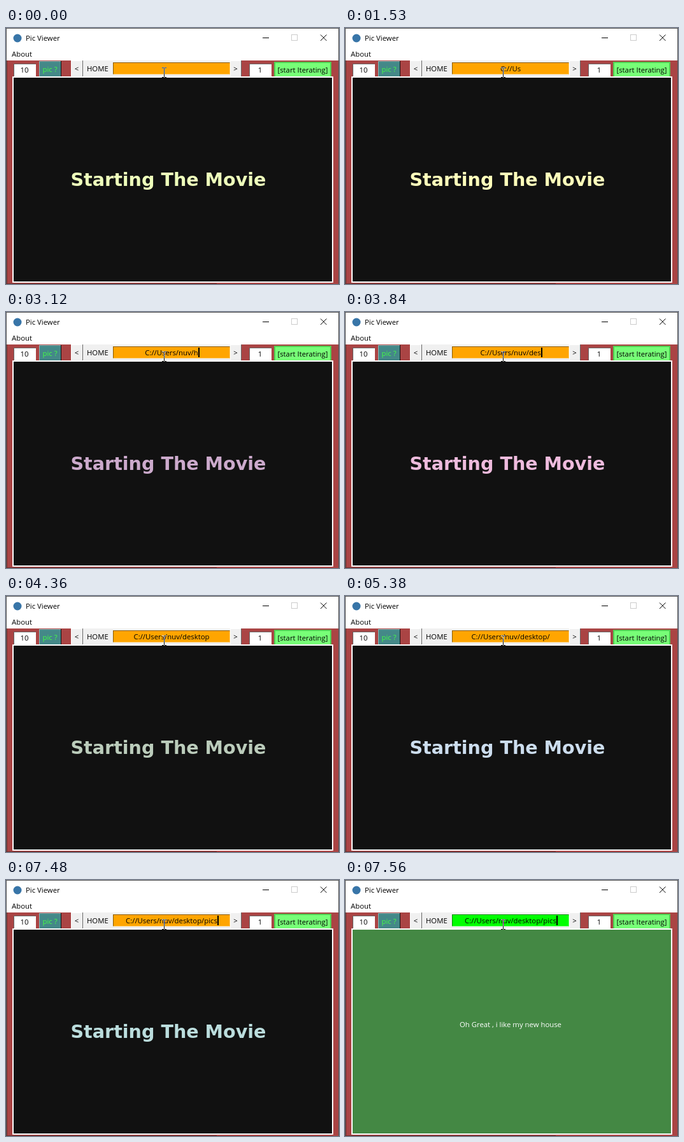
An HTML page that plays this animation: 523 px wide and 402 px high, repeating every 8 s.

```html
<!DOCTYPE html>
<html lang="en">
<head>
<meta charset="utf-8">
<title>Pic Viewer</title>
<style>
  html, body { margin: 0; width: 523px; height: 402px; overflow: hidden; }
  svg { display: block; font: 11.35px "Open Sans", sans-serif; shape-rendering: crispEdges; }
  .mid { text-anchor: middle; }
  .dark { fill: none; stroke: #696969; }
  .light { fill: none; stroke: #fff; }
  #heading { font: bold 28.6px "DejaVu Sans", sans-serif; }
  #pointer { mix-blend-mode: difference; fill: none; stroke: #fff; }
</style>
</head>
<body>
<svg width="523" height="402" viewBox="0 0 523 402">
  <rect width="523" height="402" fill="#a44"/>

  <!-- title bar and menu -->
  <rect width="523" height="51" fill="#fff"/>
  <path d="M0 .5H523M.5 0V402M522.5 0V402" stroke="#555"/>
  <path d="M1.5 51V402" stroke="#6b3030"/>
  <path d="M0 401.5H331" stroke="#6b3030"/>
  <circle cx="18" cy="16" r="6.5" fill="#3875a8" shape-rendering="auto"/>
  <text x="31" y="20">Pic Viewer</text>
  <text x="9" y="45">About</text>
  <path d="M403 15.5H413" stroke="#000"/>
  <rect x="448.5" y="10.5" width="9" height="9" fill="none" stroke="#ccc"/>
  <path d="M494 10.5L503.500 20M503.500 10.5L494 20" stroke="#000" shape-rendering="auto"/>

  <!-- left tools -->
  <rect x="12" y="56" width="35" height="20" fill="#fff"/>
  <path class="dark" d="M12.5 76V56.500H47"/>
  <text class="mid" x="29" y="70">10</text>
  <rect x="52" y="52" width="35" height="26" fill="#488"/>
  <path d="M52.500 77V52.500H86" fill="none" stroke="#8bb"/>
  <path d="M52 77.500H86.500V52" fill="none" stroke="#111"/>
  <text class="mid" x="69" y="69" fill="#4f4">pic ?</text>

  <!-- path bar -->
  <rect x="102" y="51" width="268" height="26" fill="#f0f0f0"/>
  <path class="light" d="M102.500 76V51.500H120M352.500 76V51.500H369"/>
  <path class="dark" d="M102 76.500H120.500V51M352 76.500H369.500V51"/>
  <text class="mid" x="111" y="68">&lt;</text>
  <text x="127" y="68">HOME</text>
  <text class="mid" x="360.500" y="68">&gt;</text>
  <rect id="field" x="168" y="54" width="184" height="19"/>
  <path d="M168.500 73V54.500H352" fill="none" stroke="#000" opacity=".45"/>
  <path d="M168 72.500H351.500V54" fill="none" stroke="#fff" opacity=".4"/>
  <text id="path" class="mid" x="260" y="68"></text>
  <rect id="caret" y="56" width="2" height="15"/>

  <!-- right tools -->
  <rect x="382" y="56" width="35" height="20" fill="#fff"/>
  <path class="dark" d="M382.500 76V56.500H417"/>
  <text class="mid" x="399" y="70">1</text>
  <rect x="421" y="53" width="90" height="26" fill="#7f7"/>
  <path d="M422 78H510V54H422Z" fill="none" stroke="#4b4b" stroke-width="2"/>
  <text class="mid" x="466" y="70">[start Iterating]</text>

  <!-- picture area -->
  <rect x="10" y="76" width="504" height="324" fill="#fff"/>
  <rect id="screen" x="12" y="78" width="500" height="320"/>
  <text id="heading" class="mid" x="255" y="248">Starting The Movie</text>
  <text id="message" class="mid" x="260" y="231" fill="#fff">Oh Great , i like my new house</text>
  <path id="pointer" d="M245 62.500H248M249 62.500H252M248.500 63V77M245 77.500H248M249 77.500H252"/>
</svg>
<script>
const LOOP = 8000, DONE = 7560;
const $ = id => document.getElementById(id);

// '<' is a backspace
const keys = "C://Users/nuv/h<desktop/pics";
const keyTimes = [230, 740, 970, 1300, 1480, 1530, 1600, 1710, 2040, 2310, 2380, 2480, 2540, 2780,
  3120, 3400, 3500, 3580, 3840, 3920, 4050, 4130, 4290, 4600, 5810, 5990, 6120, 6220];
const colors = "efb bdf ecc cfd dbe ffb bde fcb ced cac dfb ebd cdc bcb fdc bce cde ecb cec dbd cab dec bdd".split(" ");
const colorTimes = [0, 180, 510, 890, 1200, 1530, 1890, 2270, 2580, 2960, 3300, 3660,
  3990, 4360, 4690, 5070, 5380, 5760, 6100, 6450, 6780, 7150, 7480];

const countUntil = (times, t) => times.filter(x => x <= t).length;
const typed = n => [...keys.slice(0, n)].reduce((s, k) => k === "<" ? s.slice(0, -1) : s + k, "");
const show = (id, on) => $(id).setAttribute("visibility", on ? "visible" : "hidden");
const fill = (id, color) => $(id).setAttribute("fill", color);

function draw(t) {
  const done = t >= DONE;
  $("path").textContent = typed(countUntil(keyTimes, t));
  const width = $("path").getComputedTextLength();
  $("caret").setAttribute("x", Math.round(260 + width / 2));
  show("caret", t >= 7200 || (t + 875) % 900 < 595);
  fill("field", done ? "#0f0" : "#ffa500");
  fill("screen", done ? "#484" : "#111");
  fill("heading", "#" + colors[countUntil(colorTimes, t) - 1]);
  show("heading", !done);
  show("message", done);
}

const start = performance.now();
function tick() {
  draw((performance.now() - start) % LOOP);
  requestAnimationFrame(tick);
}
tick();
</script>
</body>
</html>
```
